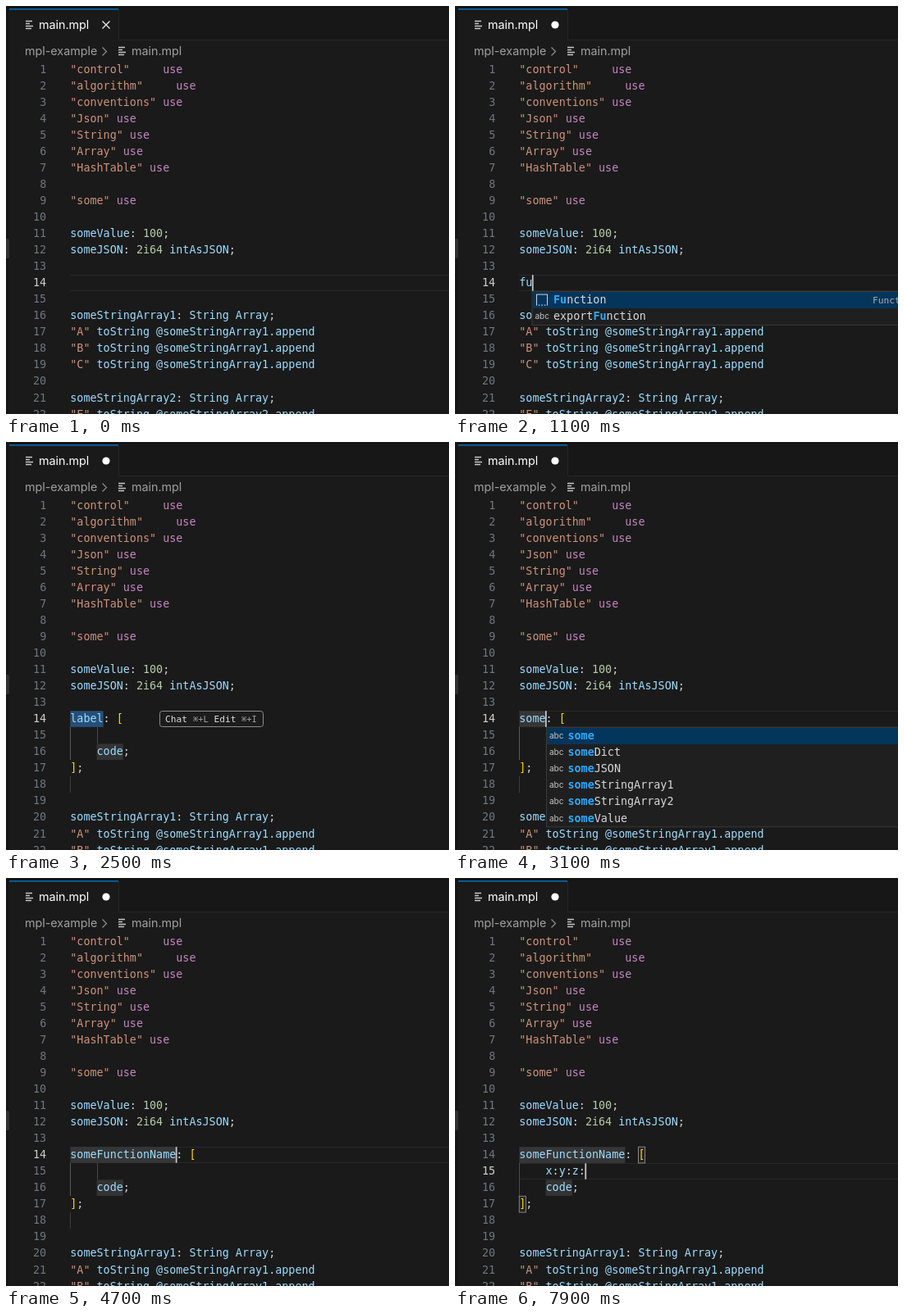
An HTML page that plays this animation: 540x498 px, repeating every 8 s.

```html
<!DOCTYPE html>
<html lang="en">
<head>
<meta charset="utf-8">
<title>Snippet completion in a code editor</title>
<style>
  html, body { margin: 0; width: 100%; height: 100%; overflow: hidden; background: #1a1a1a; }
  svg { display: block; width: 540px; height: 498px; }
  text { white-space: pre; }
  .mono { font-family: "DejaVu Sans Mono", monospace; font-size: 13.4px; }
  .ui { font-family: Inter, "Liberation Sans", sans-serif; font-size: 14.3px; }
</style>
</head>
<body>
<svg id="stage" viewBox="0 0 540 498" xmlns="http://www.w3.org/2000/svg">
  <rect width="540" height="498" fill="#1a1a1a"/>
  <rect x="137" y="3" width="403" height="38" fill="#171717"/>
  <path d="M137.5 4V41.5H540" fill="none" stroke="#252525"/>
  <rect width="540" height="3" fill="#141414"/>
  <rect width="3" height="498" fill="#151515"/>
  <rect x="4" y="3" width="133" height="1.6" fill="#0969b0"/>
  <rect x="-3" y="284" width="7" height="24" rx="2" fill="#303030"/>
  <g id="icon" fill="none" stroke="#c5c5c5" stroke-width="1.3">
    <path id="lines" d="M24 18.5h8M24 21.5h5M24 24.5h9M24 27.5h7"/>
    <use href="#lines" x="113" y="32"/>
    <path d="M117.5 50.5l5 5-5 5" stroke="#8a8a8a"/>
  </g>
  <text class="ui" x="40" y="28" fill="#fff">main.mpl</text>
  <text class="ui" x="23" y="60" fill="#a0a0a0">mpl-example</text>
  <text class="ui" x="153" y="60" fill="#a0a0a0">main.mpl</text>
  <path id="close" d="M117.5 18.5l9 9m0-9l-9 9" stroke="#e4e4e4" stroke-width="1.4"/>
  <circle id="dirty" cx="122" cy="23" r="4.6" fill="#fff"/>
  <g id="editor" class="mono"></g>
</svg>
<script>
const LOOP = 8000, CHAR = 8.067, LINE = 20.05, LEFT = 78.3, TOP = 67.2;
const $ = id => document.getElementById(id);

const head = [
  '"control"     use', '"algorithm"     use', '"conventions" use', '"Json" use',
  '"String" use', '"Array" use', '"HashTable" use', '', '"some" use', '',
  'someValue: 100;', 'someJSON: 2i64 intAsJSON;', ''
];
const append = (letter, n) => `"${letter}" toString @someStringArray${n}.append`;
const tail = [
  '', 'someStringArray1: String Array;', ...['A', 'B', 'C'].map(c => append(c, 1)),
  '', 'someStringArray2: String Array;', append('E', 2)
];

// Key presses: [time, text after the key]
const typing = (start, gap, base, word) =>
  [...word].map((_, i) => [start + i * gap, base + word.slice(0, i + 1)]);
const EXPAND = 1900, HINT = 2300, RENAME = 2780, CLOSE = 3400, DOWN = 5050;
const nameKeys = [
  [-500, ''], [980, 'f'], [1080, 'fu'], [1280, 'fun'], [1480, 'func'], [EXPAND, 'label'],
  ...typing(RENAME, 100, '', 'some'), ...typing(CLOSE, 90, 'some', 'FunctionName')
];
const bodyKeys = [
  [DOWN, ''], [5500, 'x'], [5880, 'x '], [6180, 'x y'], [6600, 'x '], [6700, 'x'],
  [6900, 'x:'], [7100, 'x:y'], [7300, 'x:y:'], [7500, 'x:y:z'], [7700, 'x:y:z:']
];
const last = (keys, t) => keys.filter(k => k[0] <= t).pop();

const lineTop = n => TOP + (n - 1) * LINE;
const baseline = n => lineTop(n) + 14.3;
const colX = c => LEFT + c * CHAR;
const rect = (x, y, w, h, fill, extra = '') =>
  `<rect x="${x}" y="${y}" width="${w}" height="${h}" fill="${fill}" ${extra}/>`;
const text = (x, y, body, fill, extra = '') =>
  `<text x="${x}" y="${y}" fill="${fill}" ${extra}>${body}</text>`;
const guide = (col, from, to, color) =>
  rect(Math.round(colX(col)), lineTop(from), 1, (to - from + 1) * LINE, color);
const box = (col, n, len, fill, extra) =>
  rect(colX(col), lineTop(n) + 0.4, len * CHAR, LINE - 0.4, fill, extra);

function colorOf(token) {
  if (token[0] === '"') return '#ce9178';
  if (token === 'use') return '#c586c0';
  if (/^\d/.test(token)) return '#b5cea8';
  if (/[[\]]/.test(token)) return '#ffd700';
  if (/[;:]/.test(token)) return '#d0d0d0';
  return '#9cdcfe';
}
const paint = code => code.replace(/"[^"]*"|[@\w.]+|[[\];:]/g,
  token => `<tspan fill="${colorOf(token)}">${token}</tspan>`);

function popup(x, items, match, snippet) {
  const y = 348.6, row = 20.1, w = 560 - x;
  let out = rect(x, y, w, row * items.length + 0.6, '#1f1f1f', 'stroke="#3a3a3a"')
    + rect(x + 0.5, y + 0.4, w, row, '#04355a');
  items.forEach((item, i) => {
    const base = y + i * row + 14.4;
    const at = item.toLowerCase().indexOf(match);
    const end = at + match.length;
    const label = item.slice(0, at)
      + `<tspan fill="#2aaaff" font-weight="bold">${item.slice(at, end)}</tspan>` + item.slice(end);
    out += snippet && i === 0
      ? rect(x + 5.5, y + 3.5, 13, 13, 'none', 'stroke="#d0d0d0"')
        + `<path d="M${x + 6} ${y + 16.5}h13" stroke="#04355a" stroke-width="2" stroke-dasharray="1.5 2"/>`
        + text(509, base - 0.3, 'Function', '#b0b0b0', 'font-size="11.2"')
      : text(x + 3.5, base - 1, 'abc', '#c5c5c5', 'class="ui" style="font-size:10px"');
    out += text(x + 26, base, label, '#d8d8d8');
  });
  return out;
}

function hint() {
  const key = 'font-size="10.4"', word = 'font-size="11.2"';
  const y = 342;
  return rect(187.5, 328.5, 126, 19, '#1c1c1c', 'rx="3" stroke="#8c8c8c"')
    + text(194, y, 'Chat', '#dedede', word) + text(228, y, '⌘+L', '#a0a0a0', key)
    + text(253.5, y, 'Edit', '#dedede', word) + text(287, y, '⌘+I', '#a0a0a0', key);
}

function editor(t) {
  const [nameTime, name] = last(nameKeys, t);
  const expanded = t >= EXPAND;
  const inBody = t >= DOWN;
  const selected = expanded && t < RENAME;
  const [keyTime, body] = inBody ? last(bodyKeys, t) : [nameTime, ''];
  const active = inBody ? 15 : 14;
  const col = inBody ? 4 + body.length : name.length;
  const middle = expanded
    ? [name + ': [', '    ' + body, '    code;', '];', ''] : [name];
  const lines = [...head, ...middle, ...tail].slice(0, 22);
  let out = '';

  if (!selected) {
    const y = Math.round(lineTop(active)) + 0.5;
    out += `<path d="M78 ${y}H540M78 ${y + 19}H540" stroke="#282828"/>`;
  }
  if (expanded) {
    out += box(0, 14, name.length, selected ? '#264f78' : '#363636') + box(4, 16, 4, '#333');
    out += guide(0, 15, 16, inBody ? '#4a4a4a' : '#5a5a5a');
    if (!inBody) out += guide(4, 15, 15, '#484848') + guide(0, 18, 18, '#3c3c3c');
    if (inBody) {
      const edge = 'stroke="#858585"';
      out += box(name.length + 2, 14, 1, '#232323', edge) + box(0, 17, 1, '#232323', edge);
    }
  }
  lines.forEach((code, i) => {
    const n = i + 1;
    out += text(49.2, baseline(n), n, n === active ? '#d0d0d0' : '#6e7681', 'text-anchor="end"')
      + text(LEFT, baseline(n), paint(code), '#9cdcfe');
  });
  if (t >= HINT && selected) out += hint();

  const x = colX(col);
  if (name && !expanded) out += popup(Math.round(x), ['Function', 'exportFunction'], name, true);
  if (t >= RENAME && t < CLOSE) {
    const words = ['', 'Dict', 'JSON', 'StringArray1', 'StringArray2', 'Value'];
    out += popup(Math.round(x) + 0.5, words.map(w => 'some' + w), name, false);
  }
  const lit = (t - keyTime) % 1000 < 500;
  if (lit && !selected && t >= 500) {
    out += rect(x - 0.6, lineTop(active) + 0.4, 1.8, LINE - 0.6, '#c4c4c4');
  }
  return out;
}

let shown = '';
function draw(t) {
  const markup = editor(t);
  if (markup !== shown) $('editor').innerHTML = shown = markup;
  const changed = t >= nameKeys[1][0];
  $('dirty').style.display = changed ? '' : 'none';
  $('close').style.display = changed ? 'none' : '';
}

const begin = performance.now();
function tick() {
  draw((performance.now() - begin) % LOOP);
  requestAnimationFrame(tick);
}
tick();
</script>
</body>
</html>
```
